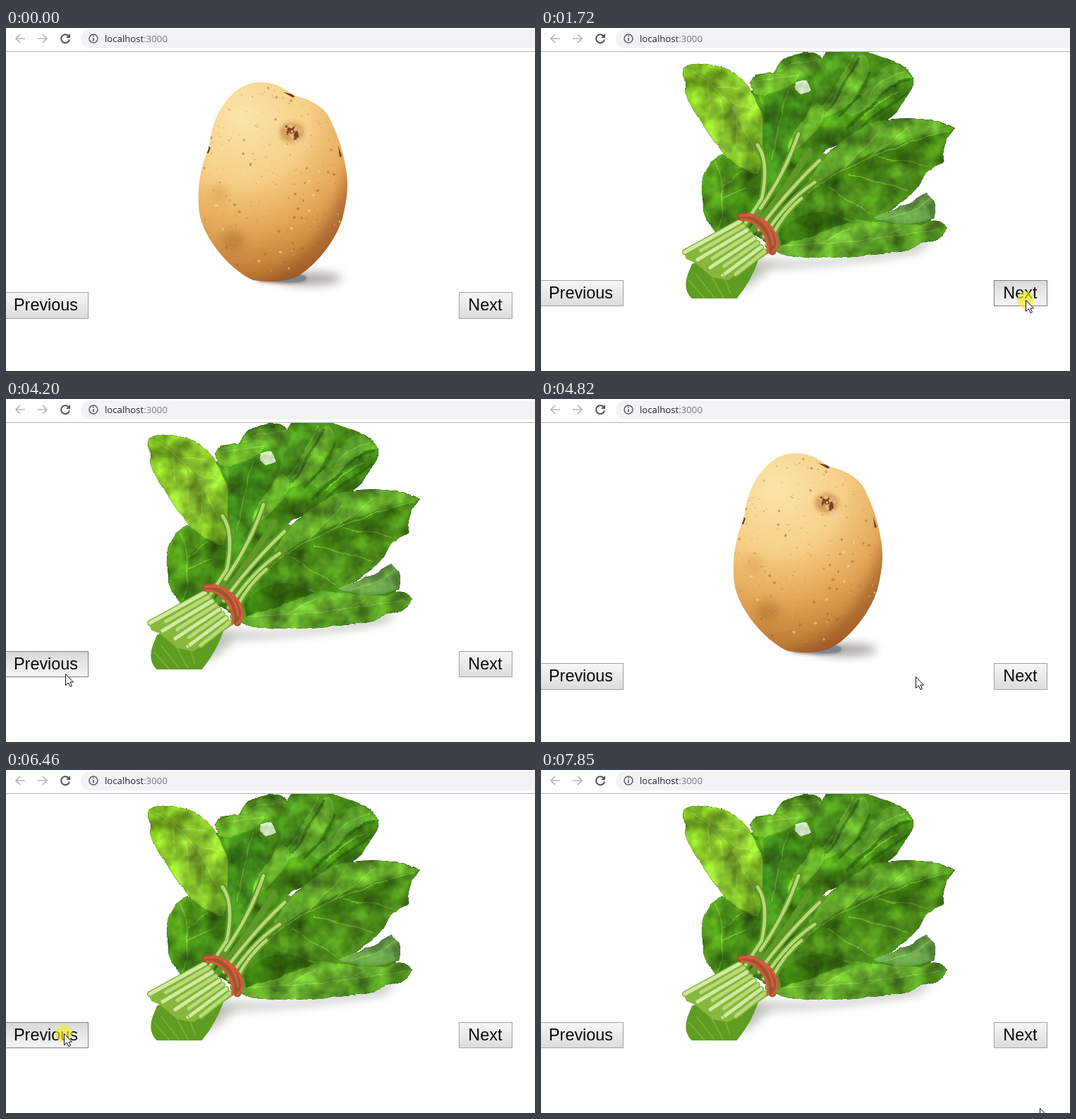
Recreate the animation shown at these times as an HTML page. Size 750x487 px, loop 8 s.

```html
<!DOCTYPE html>
<html lang="en">
<head>
<meta charset="utf-8">
<title>Image slider</title>
<style>
html, body { margin: 0; width: 100%; height: 100%; overflow: hidden; background: #fff; }
svg { display: block; width: 750px; height: 487px; }
.label { font: 23.4px "Liberation Sans", Arial, sans-serif; fill: #080808; }
.url { font: 13.2px "Open Sans", sans-serif; fill: #25272a; }
.vein { fill: none; stroke: #9ac94e; stroke-width: 1.4; opacity: .5; }
.fold { fill: none; stroke: #1c4c08; stroke-width: 4; opacity: .45; }
.line { fill: none; stroke-linecap: round; }
</style>
</head>
<body>
<svg viewBox="0 0 750 487">
<defs>
  <linearGradient id="up" x2="0" y2="1"><stop stop-color="#f7f7f7"/><stop offset="1" stop-color="#dcdcdc"/></linearGradient>
  <linearGradient id="down" x2="0" y2="1"><stop stop-color="#d9d9d9"/><stop offset="1" stop-color="#f6f6f6"/></linearGradient>
  <radialGradient id="skin" gradientUnits="userSpaceOnUse" cx="335" cy="125" r="265">
    <stop stop-color="#fce5aa"/><stop offset=".35" stop-color="#f6cf86"/><stop offset=".62" stop-color="#e2a555"/>
    <stop offset=".84" stop-color="#bf7a36"/><stop offset="1" stop-color="#945323"/>
  </radialGradient>
  <radialGradient id="red" gradientUnits="userSpaceOnUse" cx="300" cy="225" r="240">
    <stop stop-color="#e3230f"/><stop offset=".45" stop-color="#cc180f"/><stop offset=".8" stop-color="#a5150f"/><stop offset="1" stop-color="#7e1410"/>
  </radialGradient>
  <linearGradient id="lime" x2="1" y2="1"><stop stop-color="#74b01c"/><stop offset=".55" stop-color="#8ac42f"/><stop offset="1" stop-color="#6aa51f"/></linearGradient>
  <linearGradient id="green" x2="1" y2="1"><stop stop-color="#4f951c"/><stop offset=".5" stop-color="#64a52c"/><stop offset="1" stop-color="#3b7a12"/></linearGradient>
  <linearGradient id="deep" x2="1" y2="1"><stop stop-color="#579e1d"/><stop offset="1" stop-color="#347010"/></linearGradient>
  <filter id="soft" x="-40%" y="-60%" width="180%" height="220%"><feGaussianBlur stdDeviation="7"/></filter>
  <filter id="haze" x="-40%" y="-60%" width="180%" height="220%"><feGaussianBlur stdDeviation="3"/></filter>
  <filter id="crumple" filterUnits="userSpaceOnUse" x="190" y="20" width="410" height="370" color-interpolation-filters="sRGB">
    <feTurbulence type="fractalNoise" baseFrequency=".035" numOctaves="3" seed="4" result="noise"/>
    <feDisplacementMap in="SourceGraphic" in2="noise" scale="7" xChannelSelector="R" yChannelSelector="G" result="wavy"/>
    <feColorMatrix in="noise" values="1 0 0 0 0 1 0 0 0 0 1 0 0 0 0 0 0 0 0 1"/>
    <feComposite in2="wavy" operator="arithmetic" k1="1.1" k2="0" k3=".47"/>
  </filter>
  <path id="tuber" d="M363 77C338 76 320 92 309 108C293 130 291 150 287 172C276 195 270 228 274 262C279 296 315 342 350 358Q384 363 408 355C430 346 466 308 477 270C484 242 486 222 482 200C478 172 467 143 456 123C444 108 428 100 408 96C392 83 380 78 363 77Z"/>
  <path id="fruit" d="M212 158C240 140 285 121 370 122C402 125 433 142 450 165C467 190 465 222 457 255C443 302 425 335 402 371C382 407 362 447 325 454C300 452 277 422 260 399C233 363 205 315 182 278C170 259 164 245 165 222C168 198 187 174 212 158Z"/>
  <clipPath id="inTuber"><use href="#tuber"/></clipPath>
  <clipPath id="inFruit"><use href="#fruit"/></clipPath>
  <clipPath id="photo"><rect x="117" y="34" width="480" height="350"/></clipPath>
</defs>
<rect width="750" height="487" fill="#fff"/>

<g class="slide">
  <ellipse cx="430" cy="356" rx="46" ry="9" fill="#8d8988" opacity=".75" filter="url(#soft)"/>
  <ellipse cx="390" cy="356" rx="36" ry="5" fill="#5a4a44" filter="url(#haze)"/>
  <ellipse cx="404" cy="355" rx="22" ry="6" fill="#7b8790"/>
  <use href="#tuber" fill="url(#skin)"/>
  <g clip-path="url(#inTuber)">
    <path d="M488 185C470 270 430 335 350 362L430 380L500 300Z" fill="#8c4a1d" opacity=".4" filter="url(#soft)"/>
    <ellipse cx="322" cy="302" rx="15" ry="14" fill="#a56a2c" opacity=".5" filter="url(#soft)"/>
    <ellipse cx="302" cy="236" rx="11" ry="13" fill="#d99a48" opacity=".5" filter="url(#soft)"/>
    <g id="spots"></g>
    <path d="M286 166l4 4-3 8-4-1zM471 167l5 15-3 1zM393 91l18 4-4 4z" fill="#6e3b18"/>
    <ellipse cx="405" cy="148" rx="17" ry="14" fill="#b97a3a" opacity=".6" filter="url(#haze)"/>
    <g id="eye"></g>
    <path class="line" d="M409 160l8 6 8-3m-10-6l3 12m6-4l6 2" stroke="#efcda0" stroke-width="1.5"/>
  </g>
</g>

<g class="slide" clip-path="url(#photo)">
  <path d="M285 325Q400 345 560 298L535 318Q430 338 325 341L284 376Z" fill="#9ba393" filter="url(#soft)" opacity=".65"/>
  <g filter="url(#crumple)">
    <path d="M296 90L380 70L470 135L400 175L385 235L440 262L556 262L540 300L335 315L284 285L262 260L300 205L318 180Z" fill="#427f17"/>
    <path d="M228 230C229 202 243 181 264 178C286 190 306 204 315 219L302 258C284 271 279 283 250 290C233 278 227 253 228 230Z" fill="url(#deep)"/>
    <path class="vein" d="M248 190Q266 235 251 286M258 224L286 203M258 242L290 227"/>
    <path d="M296 79L304 66L331 64C340 44 357 34 379 34C400 37 407 49 400 72L384 118L342 212L318 219C310 175 317 125 312 102Z" fill="url(#deep)"/>
    <path d="M302 212C314 180 313 130 318 96L350 86L374 110L356 170L323 234Z" fill="#40851a"/>
    <path d="M297 80C300 63 333 62 370 67Q361 83 335 88Q314 99 303 94Z" fill="#67a928"/>
    <path d="M362 78l14-4 7 16-15 4-9-7z" fill="#c9dfba"/>
    <path d="M334 61C343 43 367 35 397 42L402 62L374 72Z" fill="url(#green)"/>
    <path class="vein" d="M340 61Q365 43 396 45M303 77Q335 69 369 68M350 88Q338 125 328 188"/>
    <path d="M390 93C383 69 398 44 406 30H457C479 46 507 43 527 66Q533 77 521 96C510 113 500 127 483 133C443 139 405 166 381 197L342 221L356 172Z" fill="url(#deep)"/>
    <path d="M390 94C385 68 398 48 407 30H448Q433 78 398 125Z" fill="#4a901d"/>
    <path d="M403 127C417 80 430 45 457 36Q472 52 461 80C448 104 424 119 403 127Z" fill="url(#green)"/>
    <path d="M458 92Q475 52 507 50L528 71Q505 65 484 96Q465 113 443 128L428 121Z" fill="#599c29"/>
    <path class="fold" d="M451 42Q429 80 406 118M466 62Q458 91 423 127M524 73Q494 74 474 107L433 143M520 94Q490 111 455 140"/>
    <path class="vein" d="M443 39Q424 76 395 116M516 61Q480 67 463 101M507 90Q479 103 455 130"/>
    <path d="M350 176Q357 143 390 106Q405 110 403 127Q384 159 353 177Z" fill="#62a628"/>
    <path d="M203 56C217 46 246 51 267 59C289 72 304 95 312 118C317 147 312 166 315 184L307 208C295 210 283 194 266 184C250 170 237 146 221 124C207 104 200 78 203 56Z" fill="url(#lime)"/>
    <path class="vein" d="M211 61Q276 97 303 181M235 80L240 118M256 101L258 146M276 126L277 166M246 83L282 85M268 105L302 117" style="stroke:#b4dc63"/>
    <path d="M333 295C356 270 383 257 415 262C452 278 500 279 540 279Q561 266 576 284Q570 299 548 304Q530 311 524 315C490 322 443 324 397 327Q360 330 330 315Z" fill="url(#green)"/>
    <path d="M337 291Q365 261 404 261L436 275L398 289L340 309Z" fill="#38740f"/>
    <path class="vein" d="M343 309Q459 303 565 286M401 303L440 284M468 302L511 285"/>
    <path d="M470 269C504 260 528 245 546 234Q563 245 556 270Q522 284 480 274Z" fill="#629844"/>
    <path class="vein" d="M489 272Q527 262 552 242"/>
    <path d="M365 245C385 199 408 167 444 147C484 130 542 119 587 142Q570 158 569 190Q546 204 540 216C523 246 491 264 464 273C428 275 391 260 365 248Z" fill="#4a8619"/>
    <path d="M371 237C390 190 425 145 485 131C529 124 560 131 587 142Q543 154 502 165Q431 189 371 237Z" fill="url(#green)"/>
    <path d="M373 243Q425 193 502 165L575 146Q503 209 411 228Z" fill="#35700f" opacity=".6" filter="url(#haze)"/>
    <path class="vein" d="M370 241Q437 184 580 145M425 204L477 151M465 184L525 139M405 226L469 264M438 207L521 231M478 183L548 196"/>
  </g>
  <g class="line">
    <path d="M307 166Q324 190 313 242L286 287M365 150Q346 206 305 266M380 175Q342 237 300 287M400 182Q350 230 309 286M394 213Q348 246 316 296M370 242Q344 262 322 309" stroke="#5f9828" stroke-width="9"/>
    <path d="M307 166Q324 190 313 242L288 280M365 150Q346 206 311 256M395 188Q350 230 309 286M388 219Q348 246 316 296M369 242Q340 266 321 308" stroke="#b5da74" stroke-width="4.500"/>
  </g>
  <path d="M208 350L214 335L250 318L308 330Q298 360 276 386H216Q200 373 208 350Z" fill="#5f9c22"/>
  <path d="M279 273L201 315L206 328L218 333L243 354L266 358L321 321Z" fill="#86b83c"/>
  <g class="line" id="stems"></g>
  <path class="line" d="M210 359l22 25m-12-34l25 32m-8-38l21 38m0-34l10 28" stroke="#86b544" stroke-width="2" opacity=".7"/>
  <path class="line" d="M283 268C307 266 331 286 328 317" stroke="#98582d" stroke-width="11"/>
  <path class="line" d="M282 267C304 261 331 278 335 303Q335 314 328 319M284 272C303 271 325 292 321 319M294 264Q325 273 329 307" stroke="#d75a3e" stroke-width="3.500"/>
</g>

<g class="slide">
  <path d="M462 183C487 194 493 219 492 246C488 301 451 345 420 374Q390 418 337 453L320 440L425 300Z" fill="#74574f" filter="url(#haze)"/>
  <path d="M430 145L490 132L482 161L493 176L459 169Z" fill="#c5bfc0" opacity=".7" filter="url(#haze)"/>
  <path d="M362 119Q375 96 394 112Z" fill="#ccc" filter="url(#haze)"/>
  <use href="#fruit" fill="url(#red)"/>
  <g clip-path="url(#inFruit)">
    <path d="M467 150Q456 310 328 459L375 450L480 260Z" fill="#500b0a" opacity=".4" filter="url(#soft)"/>
    <g id="seeds"></g>
    <g class="line" stroke="#ffe8e3" stroke-width="3" opacity=".9">
      <path d="M288 205Q291 224 309 224M268 224Q260 235 266 244M321 222Q330 235 319 245M288 248L302 249M423 151Q446 157 453 181M364 128L381 134M454 234L449 252M358 288L364 278"/>
    </g>
    <path d="M196 172Q218 189 250 173L280 190L300 170L350 185L388 198L370 145L260 125Z" fill="#650d09" opacity=".45" filter="url(#haze)"/>
  </g>
  <g fill="#78a637">
    <path d="M123 141Q158 151 215 144L286 130L271 118Q254 138 208 141Q165 147 123 141Z"/>
    <path d="M179 173Q204 176 221 160Q241 146 266 139Q253 165 230 177Q205 193 180 181Z" fill="#52842b"/>
    <path d="M179 173Q209 174 226 157L262 141Q239 171 209 179Z" fill="#8ab444"/>
    <path d="M312 112C318 84 322 58 347 46Q371 36 393 42Q372 54 349 57Q331 71 325 104Z" fill="#5f8d2d"/>
    <path d="M333 121C339 94 351 75 377 66Q404 57 425 71Q397 75 378 76Q359 83 346 107Z" fill="#517b29"/>
    <path d="M345 110Q366 91 398 95Q439 101 454 68Q456 88 442 100Q402 103 373 99L344 117Z" fill="#6b9a37"/>
    <path d="M229 134Q256 112 290 119L315 108L346 113L330 132L275 138Z" fill="#94b94a"/>
    <path d="M263 135Q285 119 304 130C308 158 299 184 283 198C262 186 253 157 263 135Z" fill="#a0c458"/>
    <path d="M310 130Q334 114 359 126C378 139 381 161 377 181L390 181L386 199L374 186C338 185 319 169 310 130Z" fill="#9cc253"/>
    <path class="line" d="M281 132Q286 165 282 194M272 138Q272 165 280 184M293 136Q297 161 287 185M317 129Q344 145 373 182M336 126Q362 148 372 172M318 141Q339 172 366 181M326 86Q331 56 386 42M348 96Q367 70 419 69M366 96Q425 103 450 82" stroke="#d5e494" stroke-width="1.5" opacity=".7"/>
  </g>
</g>

<g id="toolbar">
  <rect width="750" height="33" fill="#fff"/>
  <path d="M750 2H119.500a13.500 13.500 0 0 0 0 27H750Z" fill="#f1f3f4"/>
  <rect y="33" width="750" height="1" fill="#b4b4b4"/>
  <path d="M27 15H14m6-6l-6 6 6 6M45 15H58m-6-6l6 6-6 6" fill="none" stroke="#b5b6b8" stroke-width="1.700"/>
  <path d="M88.500 11A6 6 0 1 0 90 16.500" fill="none" stroke="#505357" stroke-width="2"/>
  <path d="M91 8v6h-6z" fill="#505357"/>
  <circle cx="124" cy="15" r="6" fill="none" stroke="#5a5d61" stroke-width="1.500"/>
  <path d="M124 14v4.500m0-8v1.700" stroke="#5a5d61" stroke-width="1.700"/>
  <text class="url" x="140" y="20">localhost<tspan fill="#777b80">:3000</tspan></text>
</g>

<g class="button"><rect x="-1.500" y=".5" width="118"/><text class="label" x="11" y="26">Previous</text></g>
<g class="button"><rect x=".5" y=".5" width="75"/><text class="label" x="13.300" y="26">Next</text></g>

<g id="cursor">
  <circle id="ring" r="12" fill="#f4ee20" opacity=".65"/>
  <path d="M.5.500V16.500L4.300 13L7 18.500L9.500 17.400L7 12H11.500Z" fill="#fff" stroke="#111"/>
</g>
</svg>
<script>
const $ = id => document.getElementById(id);
const LOOP = 8000;

let seed = 7;
const random = () => (seed = seed * 16807 % 2147483647) / 2147483647;
const between = (a, b) => a + (b - a) * random();

function add(parent, name, attrs) {
  const node = document.createElementNS(parent.namespaceURI, name);
  for (const key in attrs) node.setAttribute(key, attrs[key]);
  parent.append(node);
}

// Potato skin and its eye
for (let i = 0; i < 420; i++) {
  const large = i % 7 === 0;
  add($('spots'), 'ellipse', {
    cx: between(274, 484), cy: between(85, 356),
    rx: large ? between(1.3, 2.6) : between(.5, 1.5), ry: large ? 2 : between(.5, 1.5),
    fill: i % 4 ? '#a66529' : '#ffdf9c', opacity: large ? .5 : .3
  });
}
for (let i = 0; i < 34; i++) {
  const angle = between(0, 6.28), radius = between(0, 14);
  add($('eye'), 'circle', {
    cx: 404 + radius * Math.cos(angle), cy: 148 + radius * .8 * Math.sin(angle),
    r: between(1, 3), fill: i % 3 ? '#79431f' : '#e3b77d'
  });
}

// Spinach stems fan out below the band, every other one cut shorter
for (let i = 0; i < 8; i++) {
  const x = 282 + i * 5, y = 275 + i * 6;
  const reach = i % 2 ? .82 : 1;
  const dx = (204 + i * 9 - x) * reach, dy = (318 + i * 5.5 - y) * reach;
  const d = `M${x} ${y}l${dx} ${dy}`;
  add($('stems'), 'path', { d, stroke: '#86b83c', 'stroke-width': 8 });
  add($('stems'), 'path', { d, stroke: i % 2 ? '#b9da78' : '#d3eaa2', 'stroke-width': 5 });
}

// Strawberry seeds follow a rounded surface
for (let row = 0; row < 17; row++) {
  const y = 178 + row * 16.5;
  const half = 151 * Math.sqrt(1 - ((y - 210) / 255) ** 2);
  for (let a = -1.4 + row % 2 * .12; a < 1.45; a += .24) {
    const cx = 313 + half * Math.sin(a) + between(-3, 3), cy = y + between(-3, 3);
    const rx = 3 + 7 * Math.cos(a);
    add($('seeds'), 'ellipse', {
      cx, cy, rx, ry: 7.5, fill: '#8d100c', 'fill-opacity': .3,
      stroke: '#f08b7e', 'stroke-width': 1.5, 'stroke-opacity': Math.min(.6, .08 + row * .035 + Math.abs(a) * .15)
    });
    add($('seeds'), 'ellipse', { cx, cy, rx: 1.7, ry: 3.2, fill: row < 6 ? '#d5a23e' : '#a8532b' });
    if (random() < .35) add($('seeds'), 'circle', { cx: cx + 4, cy: cy - 5, r: 1.5, fill: '#ffd8d0', opacity: .75 });
  }
}

// Buttons per slide: top, left edge of Next, height
const layouts = [[375, 642, 38], [358, 642, 37], [433, 502, 38]];
// [time, slide]
const shows = [[0, 0], [920, 1], [1870, 2], [3100, 1], [4270, 0], [5510, 1], [6530, 0], [7470, 1]];
// [first step, last step, steps, x, y]
const moves = [
  [70, 460, 6, 687, 398], [1240, 1480, 4, 687, 386], [2100, 2870, 11, 88, 452],
  [3420, 3570, 3, 84, 408], [3730, 3880, 3, 84, 390], [4440, 5210, 11, 654, 398],
  [5270, 5270, 1, 663, 398], [5680, 6230, 8, 82, 374], [6530, 7240, 10, 707, 390],
  [7620, 7850, 4, 707, 480]
];
// [down, up, ring visible]
const presses = [
  [840, 920, 1], [1720, 1870, 1], [3020, 3100, 1], [4200, 4270, 0],
  [5440, 5510, 1], [6460, 6530, 1], [7390, 7470, 1]
];

function cursorAt(t) {
  let x = 700, y = 465;
  for (const [first, last, steps, toX, toY] of moves) {
    if (t < first) break;
    const interval = (last - first) / (steps - 1) || 1;
    const p = Math.min(1, (Math.floor((t - first + 6) / interval) + 1) / steps);
    x += (toX - x) * (1 - (1 - p) ** 1.94);
    y += (toY - y) * p;
  }
  return [Math.round(x), Math.round(y)];
}

const slides = document.querySelectorAll('.slide');
const buttons = document.querySelectorAll('.button');

function draw(t) {
  const current = shows.findLast(([time]) => t >= time)[1];
  const press = presses.find(([down, up]) => t >= down && t < up);
  const [x, y] = cursorAt(t);
  const [top, nextLeft, height] = layouts[current];

  slides.forEach((slide, i) => slide.style.display = i === current ? '' : 'none');
  buttons.forEach((button, i) => {
    const left = i ? nextLeft : 0, width = i ? 76 : 117;
    const hover = t >= 70 && x >= left && x < left + width && y >= top && y < top + height;
    const face = button.firstChild;
    button.setAttribute('transform', `translate(${left} ${top})`);
    face.setAttribute('height', height - 1);
    face.setAttribute('fill', hover && press ? 'url(#down)' : 'url(#up)');
    face.setAttribute('stroke', hover ? '#7c7c7c' : '#a0a0a0');
  });
  $('cursor').style.display = t < 70 ? 'none' : '';
  $('cursor').setAttribute('transform', `translate(${x} ${y})`);
  $('ring').style.display = press && press[2] ? '' : 'none';
}

const start = performance.now();
function frame() {
  draw((performance.now() - start) % LOOP);
  requestAnimationFrame(frame);
}
frame();
</script>
</body>
</html>
```
